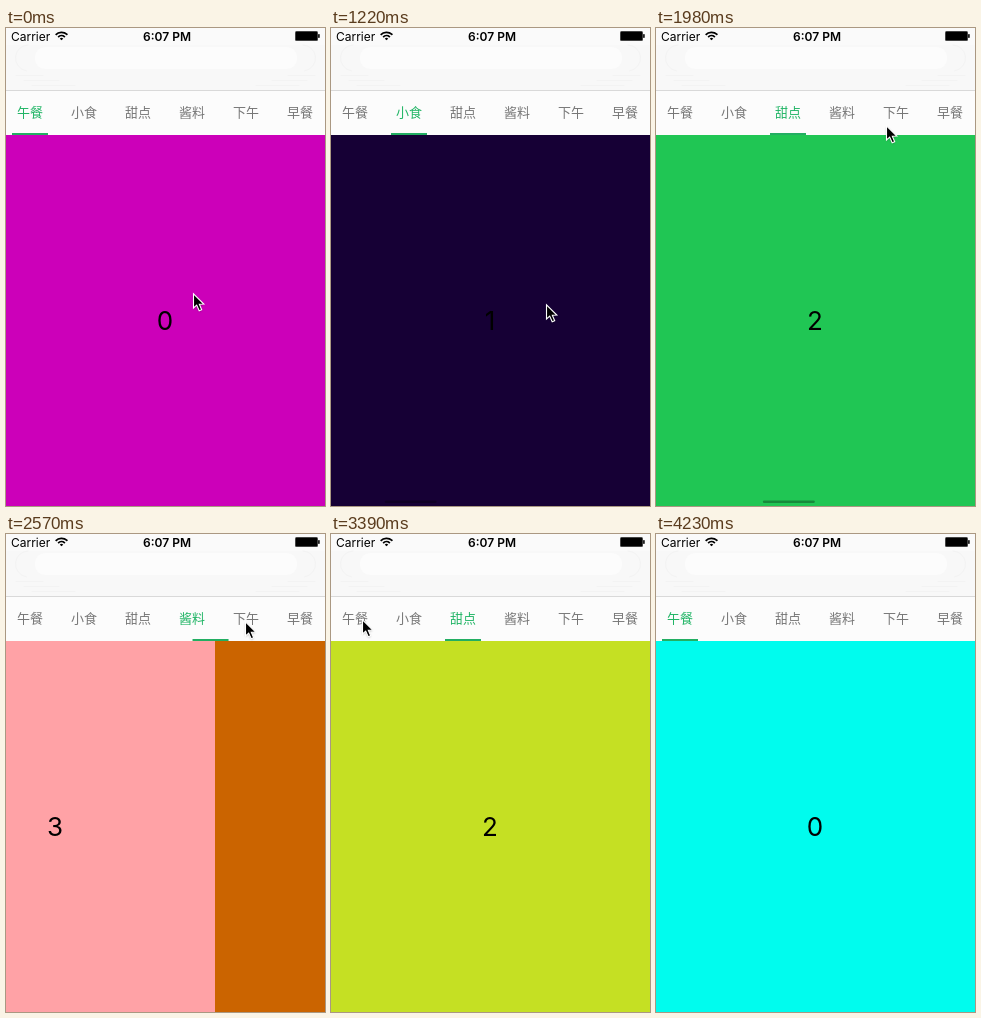
Write an HTML page with a canvas that moves like this. It is 319 px wide and 478 px high and loops after 4.66 s.

```html
<!DOCTYPE html>
<html lang="zh-CN">
<head>
<meta charset="utf-8">
<title>Paged tabs</title>
<style>
  html, body { margin: 0; width: 100%; height: 100%; overflow: hidden; background: #fff; }
  canvas { display: block; width: 319px; height: 478px; }
</style>
</head>
<body>
<canvas id="stage"></canvas>
<script>
const W = 319, H = 478, TOP = 107, TAB_STEP = 54;
const LOOP = 4660, FIRST_STEP = 240, STEP = 58.3;
const SWIPES = [715, 1300], DRAG_TIME = 165, DRAG_PART = 0.44;
const UI_FONT = 'Inter, "Liberation Sans", sans-serif';
const TAB_FONT = '13px "Noto Sans CJK SC", "Noto Sans CJK", "Noto Sans CJK JP", sans-serif';
const TABS = ['午餐', '小食', '甜点', '酱料', '下午', '早餐'];
const FIRST_COLORS = ['#cc00b9', '#160035', '#20c654', '#ffa2a6', '#cb6400'];
const LATER_COLORS = ['#00fcee', '#a68a62', '#c5e023', '#7a90c8', '#cb6400'];
const ARROW = new Path2D('M0 0V14.2L3.2 11.3L5.7 17L8.2 16L5.8 10.4L10.3 10.2Z');

const canvas = document.getElementById('stage');
const ctx = canvas.getContext('2d');
const ratio = window.devicePixelRatio || 1;
canvas.width = Math.round(W * ratio);
canvas.height = Math.round(H * ratio);

const linear = u => u;
const smooth = u => (1 - Math.cos(Math.PI * u)) / 2;
const easeOut = u => 1 - (1 - u) ** 3;
const progress = (t, start, span, curve = smooth) =>
  curve(Math.min(1, Math.max(0, (t - start) / span)));

// The finger drags part of a page, then the page settles by itself.
function swipe(t, start) {
  return DRAG_PART * progress(t, start, DRAG_TIME) +
    (1 - DRAG_PART) * progress(t, start + DRAG_TIME, 285, easeOut);
}

function scrollAt(t) {
  const swiped = SWIPES.reduce((sum, start) => sum + swipe(t, start), 0);
  return swiped + 2 * progress(t, 2413, 260) -
    2 * progress(t, 2985, 260) - 2 * progress(t, 3400, 160);
}

function cursorAt(t) {
  let x = 187, y = 265;
  const go = (start, span, toX, toY, curve) => {
    const u = progress(t, start, span, curve);
    x += (toX - x) * u;
    y += (toY - y) * u;
  };
  go(FIRST_STEP, 400, 215, 272);
  go(800, 400, 215, 276);
  for (const start of SWIPES) {
    const reach = progress(t, start, DRAG_TIME) - progress(t, start + 285, 200);
    x -= DRAG_PART * W * reach;
  }
  go(1600, 360, 230, 97);
  go(1990, 310, 239, 87);
  go(2640, 290, 132, 86);
  go(3090, 270, 31, 85);
  go(3740, 460, 288, 490, linear);
  return [x, y];
}

function text(str, x, y, font, color, align = 'center') {
  ctx.font = font;
  ctx.fillStyle = color;
  ctx.textAlign = align;
  ctx.fillText(str, x, y);
}

function rect(x, y, w, h, color) {
  ctx.fillStyle = color;
  ctx.fillRect(x, y, w, h);
}

function roundRect(x, y, w, h, r, color) {
  ctx.fillStyle = color;
  ctx.beginPath();
  ctx.roundRect(x, y, w, h, r);
  ctx.fill();
}

function drawWifi(x, y) {
  ctx.strokeStyle = ctx.fillStyle = '#000';
  ctx.lineWidth = 1.7;
  const from = -Math.PI * 0.76, to = -Math.PI * 0.24;
  for (const r of [4.6, 8]) {
    ctx.beginPath();
    ctx.arc(x, y, r, from, to);
    ctx.stroke();
  }
  ctx.beginPath();
  ctx.moveTo(x, y);
  ctx.arc(x, y, 2.3, from, to);
  ctx.fill();
}

function drawStatusBar() {
  text('Carrier', 5, 12.5, '12px ' + UI_FONT, '#000', 'left');
  drawWifi(55.5, 12.3);
  text('6:07 PM', 161, 12.5, '600 12px ' + UI_FONT, '#000');
  roundRect(289, 3, 23, 10, 1.5, '#444');
  rect(290, 4, 21, 8, '#000');
  roundRect(312, 6, 1.8, 4, 0.7, '#222');
}

function drawHeader() {
  rect(0, 0, W, 62, '#fafafa');
  rect(0, 17, W, 45, '#f8f8f8');
  // Faint ornaments mirrored in the corners.
  ctx.strokeStyle = '#f3f3f3';
  ctx.lineWidth = 1;
  for (const side of [1, -1]) {
    ctx.save();
    ctx.translate(W / 2, 0);
    ctx.scale(side, 1);
    ctx.beginPath();
    ctx.arc(-137, 30, 13, 1.7, 4.7);
    for (let i = 0; i < 3; i++) {
      ctx.moveTo(-150 + i * 8, 47.5 + i * 5);
      ctx.lineTo(-122 + i * 16, 47.5 + i * 5);
    }
    ctx.stroke();
    ctx.restore();
  }
  roundRect(29, 19, 262, 22, 10, '#fcfcfc');
  rect(0, 62, W, 1, '#d9d9d9');
}

function drawTabs(pos) {
  rect(0, 63, W, TOP - 63, '#fcfcfc');
  TABS.forEach((name, i) => {
    const color = i === Math.round(pos) ? '#22b566' : '#777';
    text(name, 24 + i * TAB_STEP, 89, TAB_FONT, color);
  });
  rect(6 + pos * TAB_STEP, 105, 36, 2, '#23ae62');
}

function drawPages(pos, t) {
  ctx.save();
  ctx.beginPath();
  ctx.rect(0, TOP, W, H - TOP);
  ctx.clip();
  // A page gets a new colour each time it is loaded again.
  const colors = t < 2750 ? FIRST_COLORS : LATER_COLORS;
  colors.forEach((color, i) => {
    const x = Math.round((i - pos) * W);
    if (Math.abs(x) >= W) return;
    rect(x, TOP, W, H - TOP, color);
    text(String(i), x + 159, 302, '26px ' + UI_FONT, '#000');
  });
  ctx.restore();
}

function drawIndicator(pos, t) {
  const alpha = 0.3 * (progress(t, 720, 50) - progress(t, 2000, 250));
  if (alpha > 0) roundRect(pos * W / 6 + 0.5, 472.5, 52, 2.5, 1.25, `rgba(0,0,0,${alpha})`);
}

function drawCursor([x, y]) {
  ctx.save();
  ctx.translate(x + 0.5, y + 0.8);
  ctx.shadowColor = 'rgba(0,0,0,0.3)';
  ctx.shadowBlur = 2 * ratio;
  ctx.shadowOffsetY = ratio;
  ctx.fillStyle = '#000';
  ctx.fill(ARROW);
  ctx.shadowColor = 'transparent';
  ctx.strokeStyle = '#fff';
  ctx.lineWidth = 1.1;
  ctx.stroke(ARROW);
  ctx.restore();
}

// The picture advances in even steps rather than continuously.
function stepTime(t) {
  return t < FIRST_STEP ? 0 : FIRST_STEP + Math.floor((t - 225) / STEP) * STEP;
}

function draw(now) {
  const t = stepTime(now % LOOP);
  const pos = scrollAt(t);
  ctx.setTransform(ratio, 0, 0, ratio, 0, 0);
  drawHeader();
  drawStatusBar();
  drawTabs(pos);
  drawPages(pos, t);
  drawIndicator(pos, t);
  if (t < 4200) drawCursor(cursorAt(t));
}

const start = performance.now();
function tick() {
  draw(performance.now() - start);
  requestAnimationFrame(tick);
}
tick();
</script>
</body>
</html>
```
